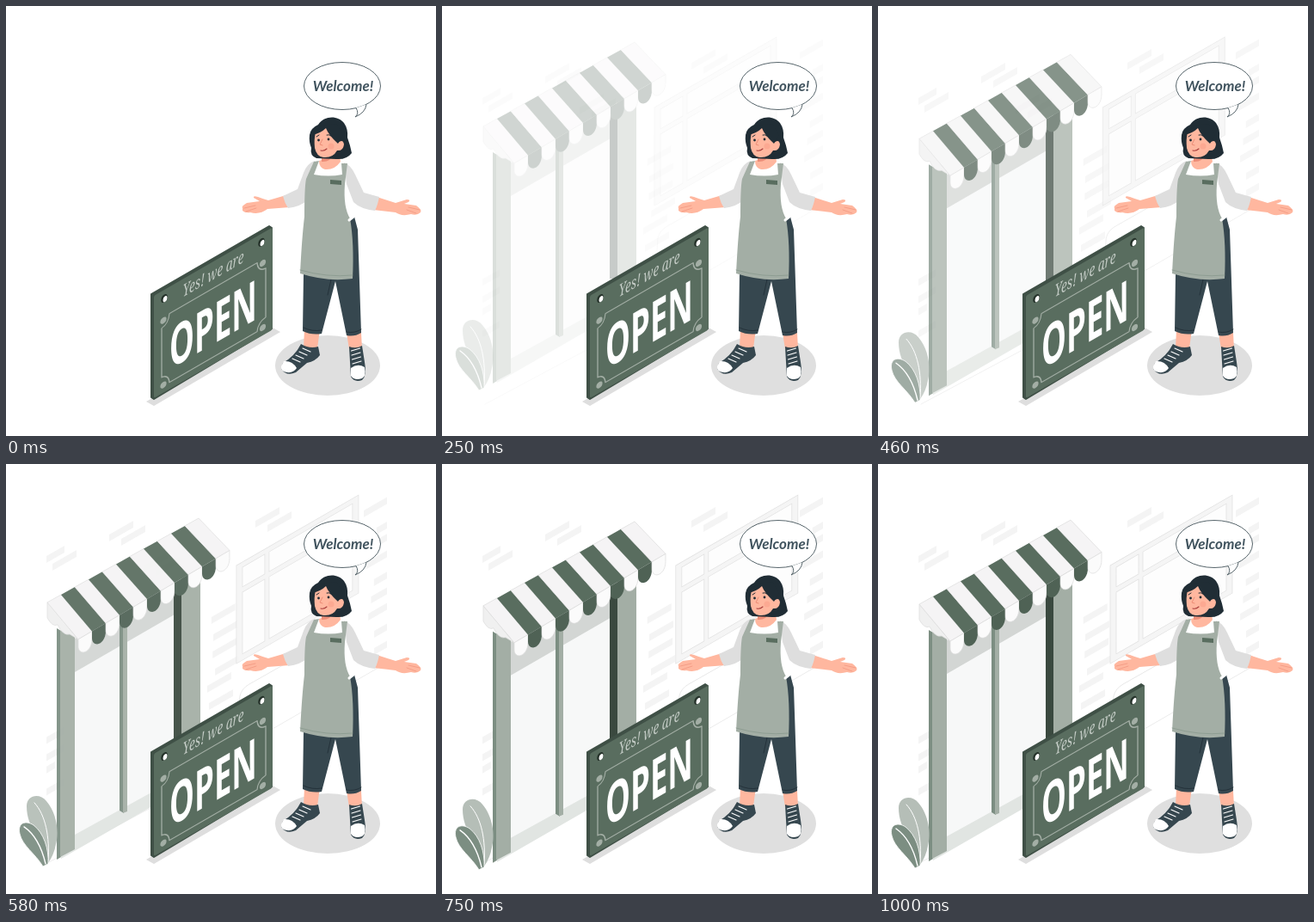
Write an HTML page that moves like this. It is 500 by 500 pixels and loops after 1040 ms.

```html
<!DOCTYPE html>
<html lang="en">
<head>
<meta charset="utf-8">
<title>Open shop</title>
<style>
html, body { margin: 0; width: 100%; height: 100%; overflow: hidden; background: #fff }
svg { display: block; width: 100vw; height: 100vh }
.line { fill: none; stroke-linecap: round; stroke-linejoin: round }
.skin { fill: #ffb79f }
.hair { fill: #202d35 }
.sage { fill: #a3aea5 }
.green { fill: #596d5f }
.mid { fill: #7c8e82 }
.navy { fill: #36474f }
.sleeve { fill: #dedede }
.white { fill: #fff }
</style>
</head>
<body>
<svg viewBox="0 0 500 500">
  <clipPath id="wallEnds"><path d="M47 0H443V500H47Z"/></clipPath>
  <g id="wall">
    <g id="bricks" fill="#f4f4f4" clip-path="url(#wallEnds)"></g>
    <path class="line" stroke="#ececec" d="M50 463L168 400M310 308L443 231"/>
  </g>

  <g id="window" stroke="#e2e2e2" stroke-width=".8">
    <g id="panes" fill="#fdfdfd" transform="matrix(1 -.577 0 1 0 155.8)">
      <rect fill="#f5f5f5" x="270" y="118" width="142" height="114"/>
    </g>
    <path fill="none" d="M273 285L274 270Q276 261 285 256L345 222"/>
  </g>

  <g id="front">
    <path fill="#f6f7f7" fill-opacity=".85" d="M80 200L196 140V385L80 449Z"/>
    <path fill="#e1e5e2" d="M80 433L196 369V385L64 461V457L80 449Z"/>
    <path fill="#d3d6d4" d="M80 205L196 140V177L80 244Z"/>
    <path class="mid" d="M59 193L64 196V459L59 462Z"/>
    <path class="sage" d="M63 196L80 190V450L63 459Z"/>
    <path class="mid" d="M132 180H137V408L132 405Z"/>
    <path class="sage" d="M136 180H141V406L136 408Z"/>
    <path fill="#3a493f" d="M195 140H205V340H195Z"/>
    <path class="sage" d="M204 130L226 120V340H204Z"/>
    <g id="awning" stroke-width=".7">
      <path fill="#f0f0f0" stroke="#dcdcdc" d="M48 163V181Q54 192 60 189Q66 202 74 200L84 206Z"/>
    </g>
  </g>

  <g id="plant">
    <path fill="#b5beb7" d="M48 466C42 440 24 425 24 400C24 387 39 384 47 394C59 408 62 430 58 444Q56 456 49 466Z"/>
    <path class="line" stroke="#fff" d="M33 396C46 410 51 436 49 463"/>
    <path class="mid" stroke="#fff" stroke-width=".8" d="M43 470C34 455 19 446 16 432C13 419 23 416 32 422C44 431 50 450 49 467Z"/>
    <path class="line" stroke="#fff" stroke-width="1.4" d="M21 424C34 433 42 450 46 467"/>
  </g>

  <ellipse cx="374" cy="418" rx="61" ry="35" fill="#dfdfdf"/>

  <path fill="#dedede" d="M163 460L172 465L319 379L310 374Z"/>
  <path fill="#3f5046" stroke="#3f5046" stroke-width="2" stroke-linejoin="round" d="M169 335L306 256L309 258V375L172 457L169 455Z"/>
  <g id="sign" transform="matrix(1 -.577 0 1 0 99.2)">
    <rect class="green" x="172" y="337" width="138" height="119" rx="2"/>
    <path class="line" stroke="#a3aea5" stroke-width="1.3" d="M190 368H292Q293 379 302 380V437Q293 438 292 448H190Q189 438 181 437V380Q189 379 190 368Z"/>
    <g text-anchor="middle">
      <text transform="translate(241 358) scale(.7 1)" font-family="'Noto Serif', serif" font-style="italic" font-size="19.5" fill="#c3cbc5">Yes! we are</text>
      <text transform="translate(241 433) scale(.56 1)" font-family="'Open Sans', sans-serif" font-weight="700" font-size="65" fill="#fff">OPEN</text>
    </g>
  </g>

  <g id="person">
    <path class="skin" d="M347 376H365L362 398H346ZM396 380H413L414 399H399Z"/>
    <path class="navy" d="M346 312L345 378Q355 383 367 381L383 320L396 383Q405 385 413 380L409 260L405 245L392 255V312Z"/>
    <path class="line" stroke="#202d35" stroke-width=".8" d="M378 318L374 336M346 374Q356 379 367 377M396 379Q405 381 413 376"/>

    <path class="navy" d="M343 393Q353 399 363 396L365 406Q360 413 350 415L337 426Q326 431 320 422L322 415Q336 407 343 393Z"/>
    <path class="white" d="M323 413Q333 412 338 421Q334 427 327 426Q319 425 320 419Z"/>
    <path class="navy" d="M399 396Q407 399 414 395L417 414Q420 430 414 435Q405 438 401 431L400 414Z"/>
    <path class="white" d="M401 421Q409 415 417 420Q419 431 414 433Q405 436 401 430Z"/>
    <g id="laces" class="line" stroke="#fff" stroke-width="1.2"></g>

    <path class="skin" d="M329 219L305 226Q298 224 293 222Q287 220 288 223L295 227L280 229Q273 233 275 235L275 238Q278 241 284 240Q295 243 304 236L330 234Z"/>
    <path class="skin" d="M428 221L453 229L466 225Q471 225 468 228L463 230L477 232Q484 237 482 240Q478 244 471 242Q460 245 453 240L427 237Z"/>
    <path class="line" stroke="#ec8d77" stroke-width=".6" d="M277 235L290 232M279 239L291 235M481 237L468 234M477 241L466 237"/>

    <path class="white" d="M356 181Q375 176 394 182L402 195L406 240L398 250L350 240Z"/>
    <path class="sleeve" d="M359 180Q350 183 346 194L339 213L322 221Q324 229 328 235Q343 233 350 226Z"/>
    <path class="sleeve" d="M393 182Q401 185 406 196L416 217L434 222Q432 232 429 238Q412 236 404 228L396 207Z"/>

    <path class="skin" d="M366 168H387L389 181Q382 191 371 190Q364 188 364 180L367 179Z"/>
    <path fill="#ec8d77" d="M367 177Q376 178 382 171Q377 182 367 181Z"/>

    <path class="sage" d="M358 181L364 180L358 196Q375 199 391 196L390 183L397 183L394 207Q392 234 400 247Q405 275 403 317Q373 321 342 311Q344 270 347 245Q347 211 349 201Z"/>
    <path class="line" stroke="#84958a" stroke-width=".7" d="M342 307Q373 316 403 313"/>
    <path class="green" d="M377 202L390 203V208L377 207Z"/>
    <path class="line" stroke="#fff" stroke-width="3" d="M399 249L404 245"/>

    <path class="hair" d="M363 138C370 127 386 127 393 136Q398 143 397 153Q400 161 402 171Q396 179 384 178L361 177Q353 174 355 165Q352 158 353 150Q354 142 363 138Z"/>
    <path class="skin" d="M360 147Q368 138 376 144Q381 150 386 159Q392 154 393 161Q392 169 385 168Q380 177 369 176Q361 175 359 165Q358 155 360 147Z"/>
    <path class="hair" d="M356 150Q366 148 372 142Q375 150 386 160L392 150L384 137L362 139Z"/>
    <path class="line" stroke="#ec8d77" d="M368 155L365 161L368 162"/>
    <circle fill="#f58f7b" opacity=".35" cx="378" cy="163" r="3.5"/>
    <circle class="hair" cx="363.5" cy="156" r="1.4"/><circle class="hair" cx="375" cy="155" r="1.4"/>
    <path class="line" stroke="#202d35" d="M361 152L364 150M373 150Q376 149 378 151"/>
    <path class="line" stroke="#a93e3c" stroke-width="1.1" d="M366 168Q370 169 373 166"/>
  </g>

  <g class="white" stroke="#46555c" stroke-width=".9">
    <ellipse cx="391" cy="93" rx="44.5" ry="27.5"/>
    <path d="M407 118.500Q411 125 406 129Q418 124 419 114.500"/>
  </g>
  <text x="392" y="99" text-anchor="middle" font-family="Lato, sans-serif" font-weight="700" font-style="italic" font-size="17" fill="#40535e">Welcome!</text>
</svg>
<script>
const LOOP = 1040, START = 170, PEAK = 690, REST = 1000;
const TRAVEL = 30, OVER = 2;
const $ = id => document.getElementById(id);

function add(parent, tag, attrs) {
  const el = document.createElementNS('http://www.w3.org/2000/svg', tag);
  for (const k in attrs) el.setAttribute(k, attrs[k]);
  $(parent).append(el);
}

let seed = 7;
const random = () => (seed = seed * 16807 % 2147483647) / 2147483647;

const brick = (x, y) => add('bricks', 'path', { d: `M${x} ${y}l28 -16v8l-28 16z` });

function brickColumn(x, top, bottom) {
  for (let y = top; y < bottom; y += 20) brick(x + 16 * random(), y);
}

for (const [x, y] of [[120, 82], [40, 111], [290, 66], [160, 118]]) {
  brick(x, y);
  brick(x + 14, y + 5);
}
brickColumn(416, 54, 220);
brickColumn(230, 178, 290);
brickColumn(28, 322, 390);

// Two columns and two rows of glass
for (const [x, width] of [[277, 26], [308, 97]])
  for (const [y, height] of [[124, 23], [153, 72]])
    add('panes', 'rect', { x, y, width, height });

// Eleven awning bands, each with a rounded flap
for (let i = 0; i < 11; i++) {
  const x = 48 + 16 * i, y = 163 - 8.9 * i, fx = x + 36, fy = 206 - 9.4 * i;
  const dark = i % 2, stroke = dark ? 'none' : '#dcdcdc';
  add('awning', 'path', { fill: dark ? '#596d5f' : '#f5f4f5', stroke,
    d: `M${x} ${y}l16 -8.9L${fx + 16} ${fy - 9.4}l-16 9.4z` });
  add('awning', 'path', { fill: dark ? '#4f6255' : '#fbfbfb', stroke,
    d: `M${fx} ${fy}l16 -9.4v9c0 9 -5 15 -10 15.5c-4 0 -6 -3 -6 -7z` });
}

for (const x of [184, 297]) {
  add('sign', 'ellipse', { cx: x, cy: 347, rx: 3.8, ry: 4.5, fill: '#26332b' });
  add('sign', 'ellipse', { cx: x + 1, cy: 348.2, rx: 2.5, ry: 3.3, fill: '#fff' });
}
for (const cx of [183, 298.5])
  for (const cy of [372, 447])
    add('sign', 'circle', { cx, cy, r: 3.6, class: 'sage' });

for (let i = 0; i < 4; i++) {
  add('laces', 'path', { d: `M${333 + 4 * i} ${410 - 4 * i}l9 4` });
  add('laces', 'path', { d: `M${403 - i / 2} ${416 - 5 * i}l10 -3` });
}

// Decelerate past the resting place, then sink back.
function offset(t) {
  if (t < START) return -TRAVEL;
  if (t < PEAK) return OVER - (TRAVEL + OVER) * ((PEAK - t) / (PEAK - START + 10)) ** 1.3;
  const v = Math.min(1, (t - PEAK) / (REST - PEAK));
  return OVER * (1 + Math.cos(Math.PI * v)) / 2;
}

function place(id, alpha, x, y) {
  $(id).setAttribute('opacity', alpha);
  $(id).setAttribute('transform', `translate(${x} ${y})`);
}

function draw(now) {
  const t = now % LOOP;
  const s = offset(t);
  const alpha = t < START ? 0 : Math.min(1, 1 + s / (TRAVEL + OVER));
  place('wall', alpha, 0, 0);
  place('window', alpha, s, 0);
  place('front', alpha, 0, s);
  place('plant', alpha, 0, s);
  requestAnimationFrame(draw);
}
draw(performance.now());
</script>
</body>
</html>
```
